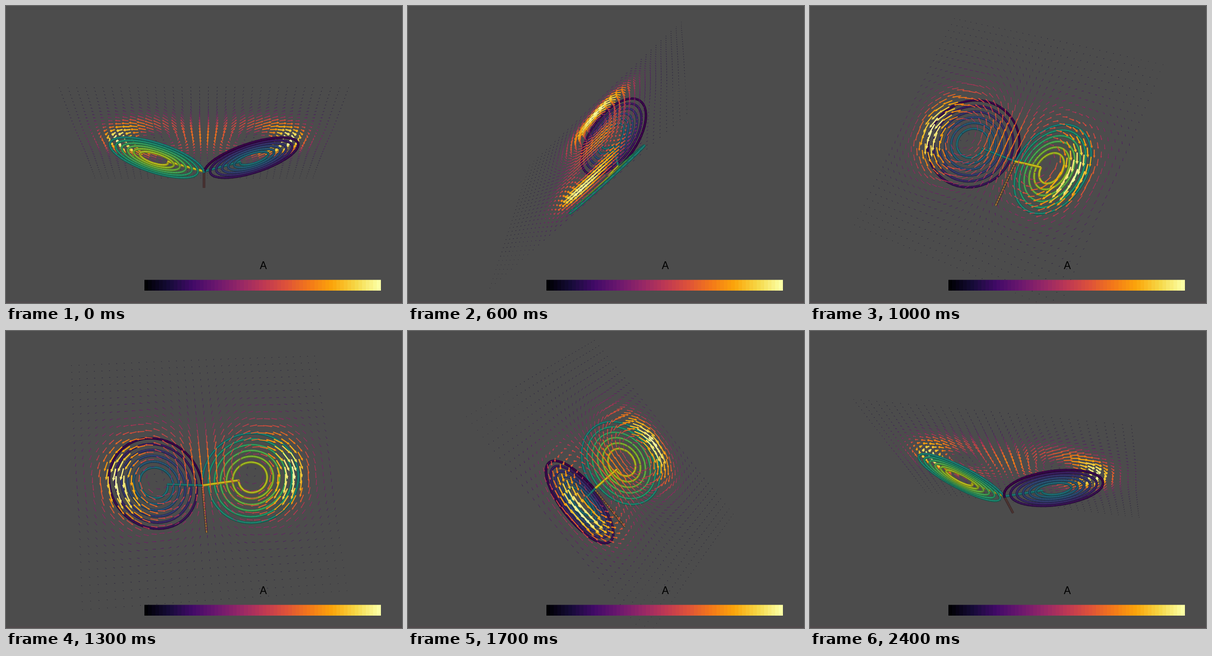
An HTML page with a canvas for the animation above (2500 ms loop, 864 by 648 pixels).

```html
<!DOCTYPE html>
<html lang="en">
<head>
<meta charset="utf-8">
<title>Vector potential of a double coil</title>
<style>
html, body { margin: 0; width: 100%; height: 100%; overflow: hidden; background: #4c4c4c; }
canvas { display: block; }
</style>
</head>
<body>
<canvas id="stage" width="864" height="648"></canvas>
<script>
const ctx = document.getElementById('stage').getContext('2d');
const RAD = Math.PI / 180;
const STEPS = 25, STEP_MS = 100;

// ---- colours ----
const ramp = s => s.split(' ').map(h => [0, 2, 4].map(i => parseInt(h.substr(i, 2), 16)));
const INFERNO = ramp('000004 160b39 420a68 6a176e 932667 bc3754 dd513a f37819 fca50a f6d746 fcffa4');
const VIRIDIS = ramp('440154 472d7b 3b528b 2c728e 21918c 28ae80 5ec962 addc30 fde725');

function tint(map, t, light = 1) {
  const u = Math.min(Math.max(t, 0), 1) * (map.length - 1);
  const i = Math.min(Math.floor(u), map.length - 2);
  const c = map[i].map((a, j) => Math.round((a + (map[i + 1][j] - a) * (u - i)) * light));
  return `rgb(${c})`;
}

// ---- coils: unit = outer coil radius, junction at the origin ----
const TURNS = 6, INNER = 0.2565, PER_TURN = 56, N = TURNS * PER_TURN;
const TILT = 16.2 * RAD, TUBE = 0.048;
const onWing = (side, u, y, lift = 0) =>
  [side * u * Math.cos(TILT), y, u * Math.sin(TILT) + lift];

function spiral(side) {
  const pts = [];
  for (let i = 0; i <= N; i++) {
    const a = i / PER_TURN * 2 * Math.PI;
    const r = INNER + (1 - INNER) * i / N;
    pts.push(onWing(side, 1 - r * Math.cos(a), -r * Math.sin(a)));
  }
  return pts;
}

const tubes = [], current = [];
const addTube = (a, b, t) =>
  tubes.push({ a, b, edge: tint(VIRIDIS, t, 0.55), core: tint(VIRIDIS, t, 0.83) });

for (const side of [-1, 1]) {
  const pts = spiral(side);
  const top = side > 0 ? 0.97 : 0.47;
  for (let i = 0; i < N; i++) {
    const a = pts[i], b = pts[i + 1];
    addTube(a, b, top - 0.47 * i / N);
    current.push({ m: a.map((v, k) => (v + b[k]) / 2), d: a.map((v, k) => v - b[k]) });
  }
  const parts = 24, len = 1 - INNER;
  for (let i = 0; i < parts; i++)
    addTube(onWing(side, len * i / parts, 0, 0.022), onWing(side, len * (i + 1) / parts, 0, 0.022), top + 0.025);
}

// ---- feed wire ----
const wire = [];
const WIRE_LEN = 0.97, WIRE_PARTS = 36;
for (let i = 0; i < WIRE_PARTS; i++)
  wire.push({
    a: [0, -WIRE_LEN * i / WIRE_PARTS, 0],
    b: [0, -WIRE_LEN * (i + 1) / WIRE_PARTS, 0],
    odd: i % 2
  });

// ---- vector field on a flat grid ----
const GRID = 34, HALF_W = 2.47, HALF_H = 2.44, PLANE_Z = 0.7;
const MAX_LEN = 0.275, FALLOFF = 1.2;

function potential(p) {
  const s = [0, 0, 0];
  for (const { m, d } of current) {
    const w = Math.hypot(p[0] - m[0], p[1] - m[1], p[2] - m[2]) ** -FALLOFF;
    s[0] += d[0] * w; s[1] += d[1] * w; s[2] += d[2] * w;
  }
  return s;
}

const arrows = [];
let peak = 0;
for (let j = 0; j < GRID; j++) {
  for (let i = 0; i < GRID; i++) {
    const p = [(2 * i / (GRID - 1) - 1) * HALF_W, (2 * j / (GRID - 1) - 1) * HALF_H, PLANE_Z];
    const v = potential(p), mag = Math.hypot(...v);
    peak = Math.max(peak, mag);
    arrows.push({ p, v, mag });
  }
}
for (const a of arrows) {
  const s = MAX_LEN / peak;
  a.len = a.mag * s;
  a.neck = a.p.map((c, k) => c + a.v[k] * s * 0.75);
  a.tip = a.p.map((c, k) => c + a.v[k] * s);
  a.color = tint(INFERNO, a.mag / peak, 0.98);
}

// ---- orbiting camera ----
const FOCAL = 1813, DIST = 16.4, FOCUS = [0, 0.012, 0.372];
const AXIS = 44 * RAD, CONE = 64 * RAD;
const dot = (a, b) => a[0] * b[0] + a[1] * b[1] + a[2] * b[2];

function camera(theta) {
  const c = Math.cos(theta), s = Math.sin(theta);
  const n = [0, Math.cos(AXIS), Math.sin(AXIS)];
  const e = [0, n[2], -n[1]];
  const out = [s, e[1] * c, e[2] * c];
  const right = [-c, s * e[1], s * e[2]];
  const back = n.map((v, k) => Math.cos(CONE) * v + Math.sin(CONE) * out[k]);
  const up = n.map((v, k) => Math.sin(CONE) * v - Math.cos(CONE) * out[k]);
  return p => {
    const q = p.map((v, k) => v - FOCUS[k]);
    const z = DIST - dot(q, back), k = FOCAL / z;
    return { x: 432 + dot(q, right) * k, y: 324 - dot(q, up) * k, z, k };
  };
}

// ---- drawing ----
function line(x1, y1, x2, y2, w, color) {
  ctx.strokeStyle = color;
  ctx.lineWidth = w;
  ctx.beginPath();
  ctx.moveTo(x1, y1);
  ctx.lineTo(x2, y2);
  ctx.stroke();
}

function drawTube(a, b, edge, core) {
  const w = TUBE * a.k;
  const dx = b.x - a.x, dy = b.y - a.y, l = Math.hypot(dx, dy) || 1;
  const ex = dx / l * 0.8, ey = dy / l * 0.8, lift = w * 0.08;
  line(a.x - ex, a.y - ey, b.x + ex, b.y + ey, w, edge);
  line(a.x - ex, a.y - ey - lift, b.x + ex, b.y + ey - lift, w * 0.55, core);
}

function drawArrow(a, p, neck, tip) {
  const size = a.len * p.k;
  const dx = tip.x - p.x, dy = tip.y - p.y, l = Math.hypot(dx, dy);
  ctx.fillStyle = a.color;
  if (l < 1.2) {
    const d = Math.max(0.75, size * 0.2);
    ctx.fillRect(p.x - d / 2, p.y - d / 2, d, d);
    return;
  }
  line(p.x, p.y, neck.x, neck.y, Math.max(0.55, size * 0.1), a.color);
  const r = Math.max(0.5, size * 0.1), nx = -dy / l * r, ny = dx / l * r;
  const facing = Math.sqrt(Math.max(0, 1 - (l / size) ** 2));
  ctx.beginPath();
  ctx.moveTo(neck.x + nx, neck.y + ny);
  ctx.lineTo(tip.x, tip.y);
  ctx.lineTo(neck.x - nx, neck.y - ny);
  ctx.fill();
  if (facing > 0.2) {
    ctx.beginPath();
    ctx.ellipse(neck.x, neck.y, r * facing, r, Math.atan2(dy, dx), 0, 2 * Math.PI);
    ctx.fill();
  }
}

function drawBar() {
  const x = 302, y = 597.5, w = 515.5, h = 23.5, cells = 64;
  for (let i = 0; i < cells; i++) {
    const l = Math.round(x + w * i / cells), r = Math.round(x + w * (i + 1) / cells);
    ctx.fillStyle = tint(INFERNO, i / (cells - 1));
    ctx.fillRect(l, y, r - l, h);
  }
  ctx.fillStyle = '#000';
  ctx.font = '23px "Liberation Sans", Arial, sans-serif';
  ctx.textAlign = 'center';
  ctx.fillText('A', 561.5, 574);
}

function draw(step) {
  const theta = step / STEPS * 2 * Math.PI;
  const view = camera(theta);
  const items = [];

  ctx.fillStyle = '#4c4c4c';
  ctx.fillRect(0, 0, 864, 648);
  ctx.fillStyle = '#514a4c';
  ctx.fillRect(0, 645, 864, 3);

  for (const t of tubes) {
    const a = view(t.a), b = view(t.b);
    items.push({ z: (a.z + b.z) / 2, paint: () => drawTube(a, b, t.edge, t.core) });
  }
  const glow = 0.8 - 0.55 * Math.max(0, Math.cos(theta));
  for (const s of wire) {
    const a = view(s.a), b = view(s.b);
    const core = s.odd ? `rgba(190,140,45,${glow})` : `rgba(140,100,60,${glow * 0.7})`;
    items.push({ z: (a.z + b.z) / 2, paint: () => drawTube(a, b, '#3d2b30', core) });
  }
  for (const r of arrows) {
    const a = view(r.p), n = view(r.neck), t = view(r.tip);
    items.push({ z: (a.z + t.z) / 2, paint: () => drawArrow(r, a, n, t) });
  }
  items.sort((a, b) => b.z - a.z);
  for (const it of items) it.paint();
  drawBar();
}

let start = null, shown = -1;
function tick(now) {
  if (start === null) start = now;
  const step = Math.floor((now - start) / STEP_MS) % STEPS;
  if (step !== shown) draw(shown = step);
  requestAnimationFrame(tick);
}
draw(shown = 0);
requestAnimationFrame(tick);
</script>
</body>
</html>
```
